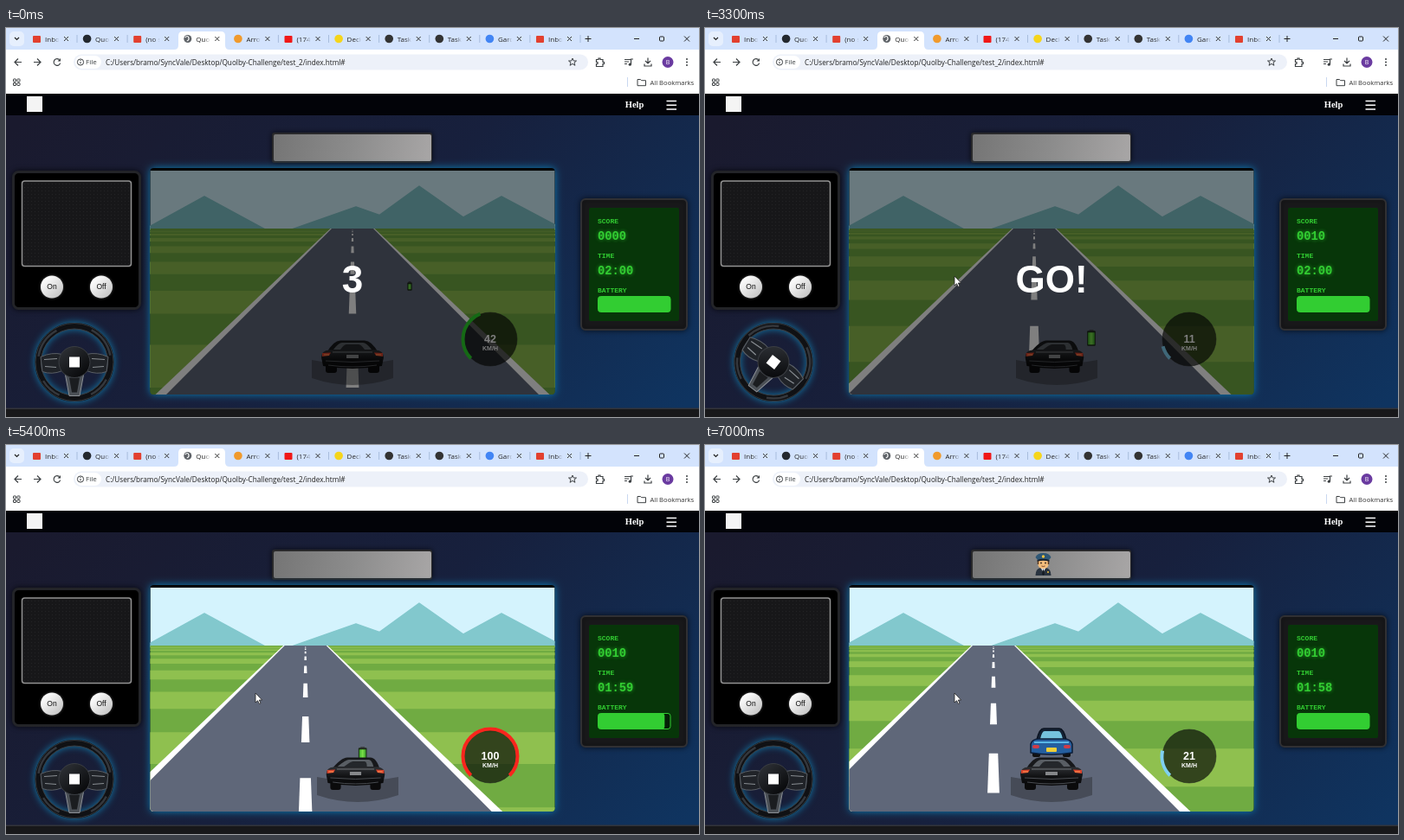
Recreate the animation shown at these times as an HTML page with a canvas. Size 800 px wide and 450 px high, loop 7100 ms.

```html
<!DOCTYPE html>
<html lang="en">
<head>
<meta charset="utf-8">
<title>Driving game</title>
<style>
html, body { margin: 0; width: 100%; height: 100%; overflow: hidden; }
canvas { display: block; width: 800px; height: 450px; }
</style>
</head>
<body>
<canvas id="stage" width="800" height="450"></canvas>
<script>
const LOOP = 7100, STEP = 100;
const HORIZON = 232, RATIO = 1.87, HALF = Math.sqrt(RATIO);
const UI = '"Open Sans", sans-serif', ARIAL = '"Liberation Sans", Arial, sans-serif';
const MONO = '"Liberation Mono", monospace';
const stage = document.getElementById('stage').getContext('2d');
let g = stage;

// Linear keyframes: [time, value] pairs
function track(keys, t) {
  for (let i = 1; i < keys.length; i++) {
    const [t0, a] = keys[i - 1], [t1, b] = keys[i];
    if (t <= t1) return a + (b - a) * (t - t0) / (t1 - t0);
  }
  return keys[keys.length - 1][1];
}
// Held value: the last pair whose time has passed
const held = (keys, t) => keys.filter(k => k[0] <= t).pop()[1];

const CENTER = [[0, 400], [2900, 400], [3700, 360], [4000, 366.5], [4200, 371], [4800, 371], [5700, 333], [7100, 333]];
const WHEEL = [[0, 0], [2900, 0], [3150, 38], [3550, 38], [3850, -40], [4100, -40], [4300, 0], [4800, 0],
  [5000, 30], [5200, 30], [5400, 0], [5600, 20], [5800, 0]];
const TURN = [[0, 0], [2900, 1], [3800, -1], [4200, 0], [4800, 1], [5700, 0]];
const SPEED = [[0, 42], [1200, 22], [3000, 11], [3300, 11], [4000, 79], [4300, 100], [5770, 100], [6100, 79], [7000, 21]];
// Distance in band periods; the verge scrolls a little slower than the lane marks
const LANE_TRAVEL = [[0, .832], [1200, 2.097], [3300, 2.55], [4000, 3.075], [5400, 6.038], [6100, 7.69], [7000, 8.71]];
const GRASS_TRAVEL = [[0, .832], [1200, 2.097], [3300, 2.55], [4000, 2.76], [5400, 5.36], [6100, 6.63], [7000, 7.64]];
const CHARGE = [[0, 100], [3600, 100], [4000, 98], [5400, 92], [5500, 100]];
const COUNT = [[0, '3'], [700, '2'], [1700, '1'], [2700, 'GO!'], [3700, '']];
const SCORE = [[0, '0000'], [2600, '0010']];
const CLOCK = [[0, '02:00'], [5200, '01:59'], [6300, '01:58']];

function box(x, y, w, h, r, fill, stroke, lw = 1) {
  g.beginPath();
  g.roundRect(x, y, w, h, r);
  if (fill) { g.fillStyle = fill; g.fill(); }
  if (stroke) { g.strokeStyle = stroke; g.lineWidth = lw; g.stroke(); }
}
function disc(x, y, r, fill, stroke, lw = 1) {
  g.beginPath();
  g.arc(x, y, r, 0, Math.PI * 2);
  if (fill) { g.fillStyle = fill; g.fill(); }
  if (stroke) { g.strokeStyle = stroke; g.lineWidth = lw; g.stroke(); }
}
function shape(d, fill, stroke, lw = 1) {
  const p = new Path2D(d);
  if (fill) { g.fillStyle = fill; g.fill(p); }
  if (stroke) { g.strokeStyle = stroke; g.lineWidth = lw; g.stroke(p); }
}
function text(s, x, y, font, fill, align = 'left') {
  g.font = font; g.fillStyle = fill; g.textAlign = align;
  g.fillText(s, x, y);
}
function gradient(x0, y0, x1, y1, ...colors) {
  const gr = g.createLinearGradient(x0, y0, x1, y1);
  colors.forEach((c, i) => gr.addColorStop(i / (colors.length - 1), c));
  return gr;
}
function glow(color, blur, draw) {
  g.save();
  g.shadowColor = color; g.shadowBlur = blur;
  draw();
  g.restore();
}

function drawTabs() {
  box(0, 0, 800, 26, 0, '#d3e3fd');
  box(4, 4, 17, 17, 5, '#e6effd');
  shape('M10 11l2.5 2.5l2.5 -2.5', null, '#222', 1.2);
  const titles = ['Inbox', 'Quolb', '(no s', 'Quo', 'Arrow', '(174)', 'Deckl', 'Tasks', 'Tasks', 'Garde', 'Inbox'];
  const icons = ['#e2402f', '#24292f', '#e2402f', '', '#f09a2c', '#f01818', '#f5d51b', '#333', '#333', '#4285f4', '#e2402f'];
  shape('M194 25Q199 25 199 20V9Q199 4 204 4H248Q253 4 253 9V20Q253 25 258 25Z', '#fff');
  titles.forEach((title, i) => {
    const x = 35.5 + 58.1 * i;
    if (i === 3) {
      disc(x, 12.5, 4.5, '#5f6368');
      shape(`M${x - 3} 11q3 -3 4 0t-2 4`, null, '#fff', 1.2);
    } else if ([0, 2, 5, 10].includes(i)) box(x - 4.5, 9, 9, 8, 1, icons[i]);
    else disc(x, 12.5, 4.8, icons[i]);
    g.save();
    g.beginPath(); g.rect(x + 8, 4, 18, 18); g.clip();
    text(title, x + 9.5, 15.5, '8px ' + UI, gradient(x + 19, 0, x + 26, 0, '#222', 'rgba(34,34,34,0)'));
    g.restore();
    shape(`M${x + 31.5} 10l5 5m0 -5l-5 5`, null, '#333', 1);
    if (i !== 2 && i !== 3) box(x + 46, 8, 1, 9, 0, '#a8bddd');
  });
  shape('M668.5 12.5h7M672 9v7M725 12.5h6M783 9.5l6 6m0 -6l-6 6', null, '#222', 1);
  box(754.5, 10, 5, 5, 1, null, '#222');
}

function drawToolbar() {
  box(0, 25, 800, 51, 0, '#fff');
  const ink = '#3c4043';
  shape('M18 39.5h-8m4 -4l-4 4l4 4M32 39.5h8m-4 -4l4 4l-4 4', null, ink, 1.2);
  g.beginPath(); g.arc(59, 39.5, 3.8, .3, 5.4);
  g.strokeStyle = ink; g.lineWidth = 1.2; g.stroke();
  shape('M63 35v3.5h-3.5z', ink);
  box(78, 30.5, 594, 18, 9, '#edf1f9');
  box(80, 32, 30, 15, 7.5, '#fff');
  disc(86, 39.5, 3.6, null, ink, 1);
  shape('M86 39v2.3M86 37v1', null, ink, 1);
  text('File', 92, 42.3, '8px ' + UI, ink);
  text('C:/Users/bramo/SyncVale/Desktop/Quolby-Challenge/test_2/index.html#', 115, 42.5, '8.2px ' + UI, '#222');
  shape('M654 35l1.3 3h3.2l-2.5 2.1l.9 3.2l-2.9 -1.9l-2.9 1.9l.9 -3.2l-2.5 -2.1h3.2z', null, ink, 1);
  shape('M681.5 36.5h2.5v-1.5h2v1.5h3v3h1.5v2h-1.5v3h-7.5v-3h1.5v-2h-1.5z', null, ink, 1.2);
  shape('M714 36.5h7M714 39h5M714 41.5h3M721.5 42v-6h2.5', null, ink, 1.2);
  disc(720.3, 42.2, 1.6, ink);
  shape('M741 34.5v6m-3 -2.5l3 3l3 -3M737 41.5v2.5h8v-2.5', null, ink, 1.2);
  disc(764, 39.5, 6.5, '#6a3ba0');
  text('B', 764, 42, '7px ' + UI, '#fff', 'center');
  for (const y of [36, 39.5, 43]) disc(786, y, 1, ink);
  for (const x of [8.5, 13]) for (const y of [59, 63.5]) box(x, y, 3, 3, .5, null, ink, 1);
  box(717, 57, 1, 11, 0, '#c9d8f0');
  shape('M729 59.5h3.5l1 1.2h5v6h-9.5z', null, ink, 1);
  text('All Bookmarks', 743.5, 65.5, '7.6px ' + UI, '#333');
}

function drawPage() {
  box(0, 101, 800, 340, 0, gradient(125, 0, 675, 545, '#1a1a2e', '#17203d', '#0f3460'));
  box(0, 76, 800, 25, 0, '#020308');
  box(0, 439.5, 800, 1.5, 0, '#33343a');
  box(0, 441, 800, 9, 0, '#18181a');
  box(24, 79, 18, 18, 0, '#f4f4f4');
  text('Help', 725.5, 92, 'bold 10.5px "Liberation Serif", serif', '#fff', 'center');
  shape('M762.5 84.5h11.5M762.5 89.2h11.5M762.5 94h11.5', null, '#fff', 1.4);

  glow('rgba(0,0,0,.7)', 6, () => box(307, 121, 185, 35, 3, '#29292b'));
  box(309, 123, 182, 31, 2, gradient(309, 123, 491, 154, '#757575', '#8c8c8c', '#a8a6a6'));

  glow('rgba(0,0,0,.6)', 6, () => box(8.5, 166.5, 146, 158, 6, '#000', '#232428', 3));
  box(18.5, 177, 126, 98.5, 3, '#171719', '#929292', 1.5);
  g.fillStyle = '#242426';
  for (let x = 21; x < 143; x += 4) for (let y = 180; y < 274; y += 4) g.fillRect(x, y, 1, 1);
  for (const [x, label] of [[53, 'On'], [110, 'Off']]) {
    glow('rgba(255,255,255,.3)', 3, () => disc(x, 299.5, 13, gradient(x - 9, 290, x + 9, 309, '#fff', '#c8c8c8')));
    text(label, x, 302, '8.5px ' + ARIAL, '#111', 'center');
  }

  glow('rgba(0,0,0,.6)', 6, () => box(664, 198, 122, 151, 5, '#19191b', '#303033', 2));
  box(673, 208, 104, 131, 2, '#073609');
  glow('#0b7fb5', 10, () => box(166.5, 162, 467, 262, 4, '#000'));
}

function drawWheel(angle) {
  g.save();
  g.translate(79, 386.5);
  glow('#1286b8', 9, () => disc(0, 0, 42, null, '#101114', 7));
  g.rotate(angle * Math.PI / 180);
  disc(0, 0, 45, null, '#33363b', 1);
  disc(0, 0, 38.5, null, '#3a3d42', 1);
  // Lit parts of the rim
  for (const [a, b] of [[3.3, 4.2], [5.2, 6.1], [.5, 1.1], [2, 2.6]]) {
    g.beginPath(); g.arc(0, 0, 42, a, b);
    g.strokeStyle = '#34373c'; g.lineWidth = 2.5; g.stroke();
  }
  shape('M-39 -6Q-26 -12 -14 -9V10Q-26 15 -37 11Z M39 -6Q26 -12 14 -9V10Q26 15 37 11Z', '#202328', '#5a5f65', 1);
  shape('M-11 12L-6 39H6L11 12Z', '#4b5056', '#8b9096', 1);
  shape('M-6 18L-3 35H3L6 18Z', '#1b1d20');
  shape('M-35 -3L-20 -4M20 -4L35 -3M-34 5L-21 6M21 6L34 5', null, '#888d92', 1.2);
  disc(0, 0, 18, gradient(-12, -15, 12, 15, '#2c2f34', '#08090b'), '#3a3d42', 1);
  box(-6, -6, 12, 12, 0, '#fff');
  g.restore();
}

function drawLandscape() {
  box(166.5, 165, 467, 68, 0, '#d4f3fd');
  g.lineJoin = 'round';
  shape('M160 233L229 195L299 233ZM330 233L404 207L431 216.5L477 183L528 219L572 195L640 231V233Z', '#82c8cd', '#82c8cd', 1.5);
}

// Stripes that grow geometrically from the horizon: [top, bottom] offsets
function stripes(travel) {
  const list = [];
  for (let n = 0; n < 10; n++) {
    const top = Math.pow(RATIO, n + travel % 1);
    if (top < 193) list.push([top, Math.min(top * HALF, 193)]);
  }
  return list;
}

function drawRoad(cx, t) {
  box(166, HORIZON, 468, 193, 0, '#70ab42');
  for (const [a, b] of stripes(track(GRASS_TRAVEL, t))) box(166, HORIZON + a, 468, b - a, 0, '#8fc04f');
  const strip = (near, far, fill) =>
    shape(`M${cx - far} ${HORIZON}H${cx + far}L${cx + near} 424H${cx - near}Z`, fill);
  strip(227.5, 25.5, '#fff');
  strip(215, 24, '#5f6779');
  for (const [a, b] of stripes(track(LANE_TRAVEL, t))) {
    const wa = .6 + .037 * a, wb = .6 + .037 * b;
    shape(`M${cx - wa} ${HORIZON + a}H${cx + wa}L${cx + wb} ${HORIZON + b}H${cx - wb}Z`, '#fff');
  }
}

function drawBattery(x, offset) {
  const h = offset * .13 + 1, w = h * .55, y = HORIZON + offset - h / 2;
  box(x - w / 2, y, w, h, 1, '#1c2b18');
  box(x - w / 4, y - 1, w / 2, 1.5, 0, '#333');
  box(x - w / 2 + 1, y + 2, w - 2, h - 3.5, .5, gradient(x - w / 2, 0, x + w / 2, 0, '#2e9e22', '#7be04a', '#278a1f'));
}

function drawPatrol(x, offset) {
  g.save();
  g.translate(x, HORIZON + offset);
  g.scale(offset / 129, offset / 129);
  box(-22, -9, 9, 9, 2, '#111');
  box(13, -9, 9, 9, 2, '#111');
  shape('M-17 -20Q-14 -33 -9 -33H9Q14 -33 17 -20Z', '#142234', '#0b1320', 1.5);
  shape('M-13 -21Q-11 -30 -8 -30H8Q11 -30 13 -21Z', '#76c2dd');
  shape('M-24 -15Q-22 -21 -15 -21H15Q22 -21 24 -15V-5Q0 -1 -24 -5Z', '#255f9f', '#0c1c36', 1.5);
  shape('M-20 -17H20', null, '#58b6e6', 2);
  box(-22, -14, 8, 4, 2, '#cf3d48');
  box(14, -14, 8, 4, 2, '#cf3d48');
  box(-6, -11, 12, 5, 1, '#f0cf39');
  g.restore();
}

function drawCar(turn) {
  g.save();
  g.translate(400 + turn * 6, 0);
  shape('M-47 384Q0 393 47 384V405Q0 421 -47 405Z', 'rgba(40,42,46,.46)');
  g.translate(-turn * 2.5, 0);
  g.scale(turn ? .94 : 1, 1);
  box(-31, 387, 13, 12, 3, '#0b0b0c');
  box(18, 387, 13, 12, 3, '#0b0b0c');
  const s = turn * 4;
  shape(`M-30 376Q${-22 + s} 361.5 ${-14 + s} 361.5H${14 + s}Q${22 + s} 361.5 30 376Z`, '#17181b');
  shape(`M-22 372Q${-16 + s} 364 ${-12 + s} 364H${12 + s}Q${16 + s} 364 22 372Z`, '#595e64');
  shape(`M-14 372Q${-10 + s} 366 ${-7 + s} 366H${7 + s}Q${10 + s} 366 14 372Z`, '#24272b');
  shape('M-36 381Q-36 373 -27 372.5H27Q36 373 36 381L34 391Q0 397 -34 391Z', gradient(0, 372, 0, 394, '#303236', '#121315', '#070708'));
  shape('M-35 376L-25 375.5L-27 379L-35 380ZM35 376L25 375.5L27 379L35 380Z', '#d8432c');
  shape('M-33 378H-27M33 378H27', null, '#ff9b55', 1);
  shape('M-23 375H23', null, '#85898d', .8);
  box(-7, 378, 14, 4, .5, '#85878a');
  shape('M-31 385Q0 388 31 385M-28 390Q0 394 28 390', null, '#4a4d52', 1);
  g.restore();
}

function drawGauge(speed) {
  const x = 559, y = 360, start = Math.PI * .75;
  disc(x, y, 31, 'rgba(8,10,6,.68)', 'rgba(30,35,30,.5)', 1);
  g.beginPath();
  g.arc(x, y, 31.5, start, start + Math.PI * 1.5 * speed / 100);
  g.strokeStyle = speed > 60 ? '#f9251d' : speed > 30 ? '#2bd32b' : '#7fd0f2';
  g.lineWidth = 4;
  g.stroke();
  text(Math.round(speed), x, 363.5, 'bold 12.5px ' + ARIAL, '#fff', 'center');
  text('KM/H', x, 373, 'bold 7px ' + ARIAL, '#fff', 'center');
}

function drawPopup(t) {
  const first = t < 5000, age = t - (first ? 3400 : 5500);
  if (age < 0 || age > 900) return;
  g.globalAlpha = 1 - age / 1500;
  text('+20%', first ? 267 : 247.5, 296, 'bold 9px ' + MONO, '#10c810', 'center');
  g.globalAlpha = 1;
}

function drawGame(t) {
  const cx = track(CENTER, t), lane = cx + 66;
  g.save();
  g.beginPath(); g.roundRect(166.5, 165, 467, 259, [0, 0, 4, 4]); g.clip();
  drawLandscape();
  drawRoad(cx, t);
  if (t < 3500) drawBattery(lane, track([[0, 67], [1200, 109], [3300, 127], [3500, 132]], t));
  if (t >= 4300 && t < 5500) drawBattery(lane, track([[4300, 4], [5400, 127]], t));
  if (t >= 6300) drawPatrol(cx + 67, track([[6300, 15], [7000, 129]], t));
  drawCar(held(TURN, t));
  drawGauge(track(SPEED, t));
  drawPopup(t);
  const count = held(COUNT, t);
  if (count) {
    box(166, 165, 468, 260, 0, 'rgba(0,0,0,.5)');
    text(count, 400, 305.5, 'bold 44px ' + ARIAL, '#fff', 'center');
  }
  g.restore();
}

function drawReadout(t) {
  const green = '#32cd32';
  const label = (s, y) => text(s, 683, y, 'bold 8px ' + MONO, green);
  const value = (s, y) => glow('rgba(50,205,50,.7)', 4, () => text(s, 683, y, 'bold 13.8px ' + MONO, green));
  label('SCORE', 225.5);
  value(held(SCORE, t), 244.5);
  label('TIME', 265.5);
  value(held(CLOCK, t), 284.5);
  label('BATTERY', 305.5);
  box(683.5, 310.5, 83.5, 18, 3, '#042006', green, 1);
  box(683.5, 310.5, 83.5 * track(CHARGE, t) / 100, 18, 3, green);
}

function drawOfficer() {
  g.save();
  g.translate(390.5, 125);
  shape('M-9 26Q-9 18 -3 17H3Q9 18 9 26Z', '#29333f');
  shape('M-3 17H3L0 22Z', '#e9edf0');
  shape('M0 18L1.5 24L0 26L-1.5 24Z', '#151a20');
  box(-6, 7, 12, 11, 5, '#f3bd7c');
  shape('M-6 9V13M6 9V13', null, '#573820', 1.5);
  disc(-2.5, 11.5, .9, '#33251b');
  disc(2.5, 11.5, .9, '#33251b');
  shape('M-2 15Q0 16 2 15', null, '#7a4930', 1);
  shape('M-9 5Q-7 0 0 0Q7 0 9 5L6.5 8H-6.5Z', '#2f5775');
  shape('M-7 8Q0 5.5 7 8V9.5Q0 8 -7 9.5Z', '#16212e');
  disc(0, 4, 1.7, '#f2c33d');
  disc(5.5, 22, 1, '#f2c33d');
  g.restore();
}

function drawCursor() {
  shape('M288 287V298L290.6 295.7L292.3 299.4L294 298.6L292.3 295H295.6Z', '#fff', '#222', .8);
}

const backdrop = document.createElement('canvas');
backdrop.width = 800;
backdrop.height = 450;
g = backdrop.getContext('2d');
drawPage();
drawTabs();
drawToolbar();
g = stage;

function frame(now) {
  const t = Math.floor(now % LOOP / STEP) * STEP;
  g.drawImage(backdrop, 0, 0);
  drawWheel(track(WHEEL, t));
  drawGame(t);
  drawReadout(t);
  if (t >= 6300) drawOfficer();
  if (t >= 800) drawCursor();
  requestAnimationFrame(() => frame(performance.now() - begin));
}
const begin = performance.now();
frame(0);
</script>
</body>
</html>
```
